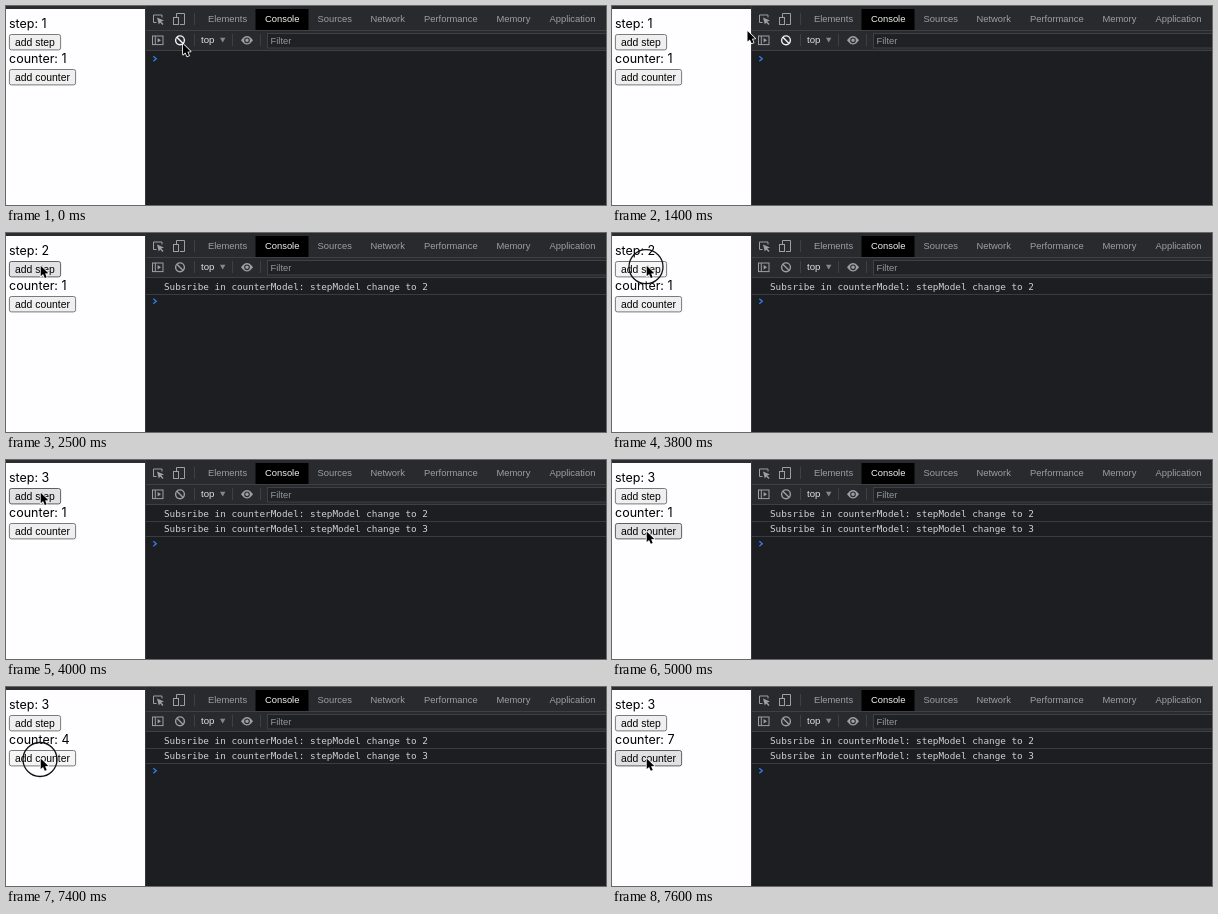
These frames come from a looping animation (600x199 px, 8 s). An HTML page with a canvas:

```html
<!DOCTYPE html>
<html lang="en">
<head>
<meta charset="utf-8">
<title>Step and counter</title>
<style>
html, body { margin: 0; width: 100%; height: 100%; overflow: hidden; background: #1d1e21; }
canvas { display: block; width: 600px; height: 199px; }
</style>
</head>
<body>
<canvas id="stage"></canvas>
<script>
const LOOP = 8000, TICK = 100;
const SANS = '"Liberation Sans", Arial, sans-serif';
const PAGE = 'Inter, "Open Sans", sans-serif';
const MONO = '"DejaVu Sans Mono", monospace';
const GREY = '#9aa0a6', LINE = '#3d4045';
const EDGE = 139, ROW = 15.5;

const canvas = document.getElementById('stage');
const ctx = canvas.getContext('2d');
const dpr = window.devicePixelRatio || 1;
canvas.width = 600 * dpr;
canvas.height = 199 * dpr;
ctx.scale(dpr, dpr);

const tabs = [['Elements', 202], ['Console', 259], ['Sources', 311.5], ['Network', 364.5],
  ['Performance', 418], ['Memory', 490.5], ['Application', 543.5]];
const presses = [[2400, 2500], [3800, 4000], [6200, 6300], [7400, 7500]];

function rect(x, y, w, h, color) {
  ctx.fillStyle = color;
  ctx.fillRect(x, y, w, h);
}

function text(str, x, y, size, font, color) {
  ctx.font = `${size}px ${font}`;
  ctx.fillStyle = color;
  ctx.fillText(str, x, y);
}

function stroke(points, color, width = 1) {
  ctx.strokeStyle = color;
  ctx.lineWidth = width;
  ctx.beginPath();
  points.forEach(([x, y]) => ctx.lineTo(x, y));
  ctx.stroke();
}

function fill(points, color) {
  ctx.fillStyle = color;
  ctx.beginPath();
  points.forEach(([x, y]) => ctx.lineTo(x, y));
  ctx.fill();
}

function box(x, y, w, h, color) {
  ctx.strokeStyle = color;
  ctx.lineWidth = 1;
  ctx.strokeRect(x, y, w, h);
}

function ring(x, y, r, color, width) {
  ctx.strokeStyle = color;
  ctx.lineWidth = width;
  ctx.beginPath();
  ctx.arc(x, y, r, 0, Math.PI * 2);
  ctx.stroke();
}

const smooth = p => p * p * (3 - 2 * p);
const easeOut = p => 1 - (1 - p) ** 2;
const mix = (a, b, p) => a + (b - a) * p;
const progress = (t, from, to) => Math.min(1, Math.max(0, (t - from) / (to - from)));

function pointer(t) {
  if (t < 1400) return [177, 38];
  if (t < 1500) return [135.5, 25];
  if (t < 4500) {
    const p = easeOut(progress(t, 1600, 2100));
    return [mix(67, 34.7, p), mix(0.5, 32.7, p)];
  }
  return [34.7, mix(32.7, 71.5, smooth(progress(t, 4400, 5000)))];
}

function button(label, y, w, [px, py], pressed) {
  const hover = px >= 3 && px <= 3 + w && py >= y && py <= y + 16;
  ctx.beginPath();
  ctx.roundRect(3.4, y + 0.5, w - 0.8, 15.4, 2);
  ctx.fillStyle = !hover ? '#efefef' : pressed ? '#f5f5f5' : '#e1e1e3';
  ctx.fill();
  ctx.strokeStyle = hover && !pressed ? '#505050' : '#6c6c6c';
  ctx.lineWidth = 0.9;
  ctx.stroke();
  text(label, 9, y + 11.8, 10.4, SANS, '#000');
}

function drawPage(step, counter, at, pressed) {
  rect(0, 0, EDGE, 3, '#2c2d30');
  rect(0, 3, EDGE, 196, '#fefdff');
  text('step: ' + step, 3, 22, 12.5, PAGE, '#000');
  button('add step', 28, 52, at, pressed);
  text('counter: ' + counter, 3, 57, 12.5, PAGE, '#000');
  button('add counter', 63, 67, at, pressed);
}

function drawTabs() {
  rect(EDGE, 0, 461, 24, '#292a2d');
  rect(249.5, 3, 53, 21, '#000');
  for (const [name, x] of tabs)
    text(name, x, 16, 9.4, SANS, name === 'Console' ? '#f1f3f4' : GREY);
  rect(188, 7, 1, 12, LINE);

  // Inspect and device icons
  ctx.save();
  ctx.translate(0, -0.5);
  stroke([[150.5, 17], [147.5, 17], [147.5, 9.5], [156, 9.5], [156, 12]], GREY);
  fill([[151, 12], [158, 15], [155.2, 16], [157.5, 18.5], [156.5, 19.4], [154.2, 17], [152.8, 19]], GREY);
  stroke([[170.5, 12], [170.5, 8], [178.5, 8], [178.5, 19], [174, 19]], GREY);
  box(167.5, 12, 5, 7, GREY);
  ctx.restore();
}

function drawTools(lit) {
  rect(EDGE, 25, 461, 20, '#292a2d');
  rect(EDGE, 24, 461, 1, LINE);
  rect(EDGE, 44, 461, 1, LINE);

  box(146.5, 30, 10.5, 8.6, GREY);
  stroke([[149.3, 30], [149.3, 38.6]], GREY);
  fill([[151.6, 32], [155, 34.3], [151.6, 36.6]], GREY);

  const tone = lit ? '#f1f3f4' : GREY;
  ring(174, 34.3, 4.4, tone, 1.4);
  stroke([[170.9, 31.2], [177.1, 37.4]], tone, 1.4);

  rect(188, 28, 1, 12, LINE);
  text('top', 195, 37.4, 9.6, SANS, '#dfe1e5');
  fill([[214, 31.8], [219.4, 31.8], [216.7, 36.6]], '#84888d');
  rect(226, 28, 1, 12, LINE);

  ctx.fillStyle = GREY;
  ctx.beginPath();
  ctx.moveTo(235, 34.3);
  ctx.quadraticCurveTo(241, 25.8, 247, 34.3);
  ctx.quadraticCurveTo(241, 42.8, 235, 34.3);
  ctx.fill();
  ring(241, 34.3, 2.3, '#292a2d', 1.1);

  rect(254, 28, 1, 12, LINE);
  rect(261, 27, 339, 15, '#202124');
  box(261.5, 27.5, 345, 14.5, LINE);
  text('Filter', 264.5, 38, 9.4, SANS, '#92979d');
}

function drawConsole(logs) {
  rect(EDGE, 45, 461, 154, '#1d1e21');
  for (let i = 0; i < logs; i++) {
    const y = 45 + i * ROW;
    text('Subsribe in counterModel: stepModel change to ' + (i + 2),
      158, Math.floor(y + 12), 9.33, MONO, '#d0d1d4');
    rect(EDGE, Math.round(y + 15.6), 461, 1, '#393b3f');
  }
  const y = 52.8 + logs * ROW;
  stroke([[147.3, y - 2.5], [150.3, y], [147.3, y + 2.5]], '#367cf1', 1.3);
}

function drawPointer([x, y], pressed) {
  if (pressed) ring(x - 0.7, y + 1, 17, '#111', 1.3);
  ctx.save();
  ctx.translate(x, y);
  ctx.beginPath();
  [[0, 0], [0, 10.6], [2.4, 8.4], [4.1, 12.3], [6, 11.5], [4.4, 7.7], [7.6, 7.5]]
    .forEach(([px, py]) => ctx.lineTo(px, py));
  ctx.closePath();
  ctx.lineJoin = 'round';
  ctx.strokeStyle = '#fff';
  ctx.lineWidth = 1.6;
  ctx.stroke();
  ctx.fillStyle = '#000';
  ctx.fill();
  ctx.restore();
}

function draw(t) {
  const at = pointer(t);
  const pressed = presses.some(([from, to]) => t >= from && t < to);
  const logs = (t >= 2500) + (t >= 4000);
  const counter = 1 + 3 * ((t >= 6300) + (t >= 7500));
  drawConsole(logs);
  drawTabs();
  drawTools(t < 1500);
  drawPage(1 + logs, counter, at, pressed);
  rect(EDGE, 0, 1, 199, '#35363a');
  drawPointer(at, pressed);
}

const start = performance.now();
function frame() {
  const t = (performance.now() - start) % LOOP;
  draw(Math.floor(t / TICK) * TICK);
  requestAnimationFrame(frame);
}
frame();
</script>
</body>
</html>
```
